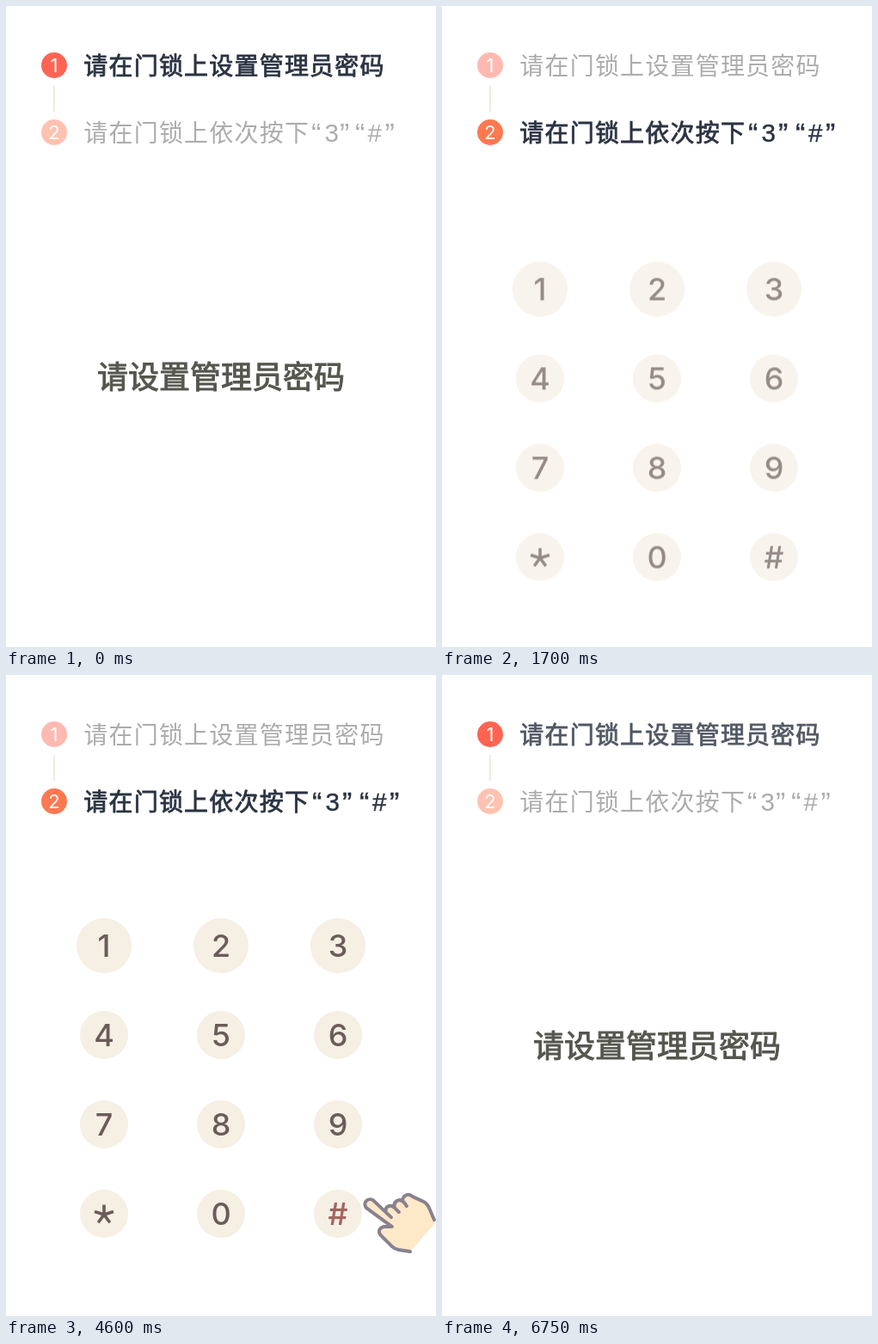
An HTML page that plays this animation: 500 px wide and 746 px high, repeating every 6.79 s.

```html
<!DOCTYPE html>
<html lang="zh-CN">
<head>
<meta charset="utf-8">
<style>
  html, body { margin: 0; width: 100%; height: 100%; overflow: hidden; background: #fff; }
  svg { display: block; width: 100vw; height: 100vh; }
  text { font-family: "Noto Sans CJK SC", "Noto Sans CJK", sans-serif; }
  .step { font-size: 28px; letter-spacing: 1.2px; }
  .step .sign { font-family: "Liberation Sans", sans-serif; font-size: 29.5px; }
  .step .quote { font-family: "Liberation Sans", sans-serif; font-size: 34px; }
  /* A thin stroke gives the medium weight the CJK face lacks. */
  .on { fill: #2b3342; stroke: #2b3342; stroke-width: .8px; }
  .on tspan { stroke-width: .4px; }
  .off { fill: #acacac; font-weight: 300; }
  .badge { font: 400 22px Inter, sans-serif; fill: #fff; text-anchor: middle; }
  .digit { font: 500 36px Inter, sans-serif; fill: #6b5c5a; text-anchor: middle; }
  .hot { fill: #e8706a; }
  #message { font-size: 36px; fill: #55574f; stroke: #55574f; stroke-width: 1px; }
</style>
</head>
<body>
<svg viewBox="0 0 500 746" preserveAspectRatio="none">
  <path d="M56 93V123" stroke="#eeeae2" stroke-width="2"/>
  <g id="header"></g>
  <text id="message" x="106" y="444.7">请设置管理员密码</text>
  <g id="keypad"></g>
  <g id="hand" stroke="#493d50" stroke-width="4" stroke-linecap="round" stroke-linejoin="round">
    <path fill="#fddcaa" stroke="none" d="M437 356L407 334C402 327 411 320 417 327L430 339C428 332 436 329 440 334C438 325 446 322 449 326C450 318 457 317 461 321L472 326Q478 329 480 334L487 352L458 385L445 383Q440 382 437 379L424 366C421 363 421 358 427 356Z"/>
    <path fill="none" d="M458 385L445 383Q440 382 437 379L424 366C421 363 421 358 427 356L437 356L407 334C402 327 411 320 417 327L436 345M430 339C428 332 436 329 441 335L445 339M440 334C438 325 447 322 452 329L454 332M449 326C450 318 457 317 461 321L472 326Q478 329 480 334L486 348"/>
  </g>
</svg>
<script>
const LOOP = 6790, TICK = 50, SHIFT = 50;
const $ = id => document.getElementById(id);

const steps = [
  { y: 69, color: '#ff6453', text: '请在门锁上设置管理员密码' },
  { y: 147, color: '#ff7850', text: '请在门锁上依次按下', tail: true }
];

// Quoted keys after the second step; the active weight sets them wider.
function tail(y, active) {
  const xs = active ? [356, 371.5, 391, 411, 426, 446] : [355, 370.5, 388, 406, 420.5, 440.5];
  return [...'“3”“#”'].map((c, i) => '3#'.includes(c)
    ? `<tspan class="sign" x="${xs[i]}" y="${y}">${c}</tspan>`
    : `<tspan class="quote" x="${xs[i]}" y="${y + 2.5}">${c}</tspan>`).join('');
}

function stepLabel(s, active) {
  const cls = active ? 'on' : 'off';
  return `<text class="step ${cls}" x="90.3" y="${s.y + 10.8}">${s.text}${s.tail ? tail(s.y + 10.8, active) : ''}</text>`;
}

$('header').innerHTML = steps.map((s, i) => `
  <circle class="dot" cx="56" cy="${s.y}" r="15" fill="${s.color}"/>
  <text class="badge" x="56" y="${s.y + 8}">${i + 1}</text>
  <g class="idle">${stepLabel(s, false)}</g><g class="active">${stepLabel(s, true)}</g>`).join('');

function star(x, y) {
  let d = '';
  for (let i = 0; i < 5; i++) {
    const a = (i * 72 - 90) * Math.PI / 180;
    d += `M${x} ${y}L${x + 11.5 * Math.cos(a)} ${y + 11.5 * Math.sin(a)}`;
  }
  return `<path d="${d}" stroke="#6b5c5a" stroke-width="3.6"/>`;
}

$('keypad').innerHTML = [...'123456789*0#'].map((c, i) => {
  const x = 114 + 136 * (i % 3), row = Math.floor(i / 3), y = 315 + 104 * row;
  const digit = cls => `<text class="digit ${cls}" x="${x}" y="${y + 13}">${c}</text>`;
  return `<circle cx="${x}" cy="${y}" r="${row ? 28 : 32}" fill="#f5efe4"/>`
    + (c === '*' ? star(x, y + 1) : digit(''))
    + ('3#'.includes(c) ? digit('hot') : '');
}).join('');

const idle = document.querySelectorAll('.idle');
const active = document.querySelectorAll('.active');
const dots = document.querySelectorAll('.dot');
const hot = document.querySelectorAll('.hot');

// Linear interpolation over time/value pairs.
function track(t, ...k) {
  if (t <= k[0]) return k[1];
  for (let i = 2; i < k.length; i += 2) {
    if (t < k[i]) return k[i - 1] + (k[i + 1] - k[i - 1]) * (t - k[i - 2]) / (k[i] - k[i - 2]);
  }
  return k[k.length - 1];
}

function place(el, x, y, opacity) {
  el.setAttribute('transform', `translate(${x} ${y})`);
  el.setAttribute('opacity', opacity);
}

function render(t) {
  const labels = [
    track(t, 800, 1, 1250, 0, 5800, 0, 6050, .4, 6750, .8),
    track(t, 700, 0, 900, .15, 1250, 1, 5800, 1, 6450, 0)
  ];
  labels.forEach((p, i) => {
    active[i].setAttribute('opacity', p);
    idle[i].setAttribute('opacity', 1 - p);
  });
  const dotSecond = track(t, 700, 0, 1300, 1, 6000, 1, 6450, 0);
  [1 - dotSecond, dotSecond].forEach((p, i) => dots[i].setAttribute('opacity', .45 + .55 * p));

  // Position runs from 1 (below) through 0 (in place) to -1 (above).
  const message = t < 3000 ? track(t, 660, 0, 1110, -1) : track(t, 6310, 1, 6750, 0);
  const keypad = track(t, 1380, 1, 1830, 0, 5800, 0, 6300, -1);
  place($('message'), 0, message * SHIFT, 1 - Math.abs(message));
  place($('keypad'), 0, keypad * SHIFT, 1 - Math.abs(keypad));

  const press = [
    track(t, 2300, 0, 2800, 1, 3500, 1, 3900, 0),
    track(t, 4370, 0, 4870, 1, 5700, 1, 6000, 0)
  ];
  press.forEach((p, i) => hot[i].setAttribute('opacity', p));
  const low = t > 4150 ? 1 : 0, p = press[low];
  place($('hand'), 22 * (1 - p), low * 312 - 48 * (1 - p), Math.min(1, p * 1.4));
}

const start = performance.now();
function frame() {
  const t = (performance.now() - start) % LOOP;
  render(Math.floor(t / TICK) * TICK);
  requestAnimationFrame(frame);
}
frame();
</script>
</body>
</html>
```
